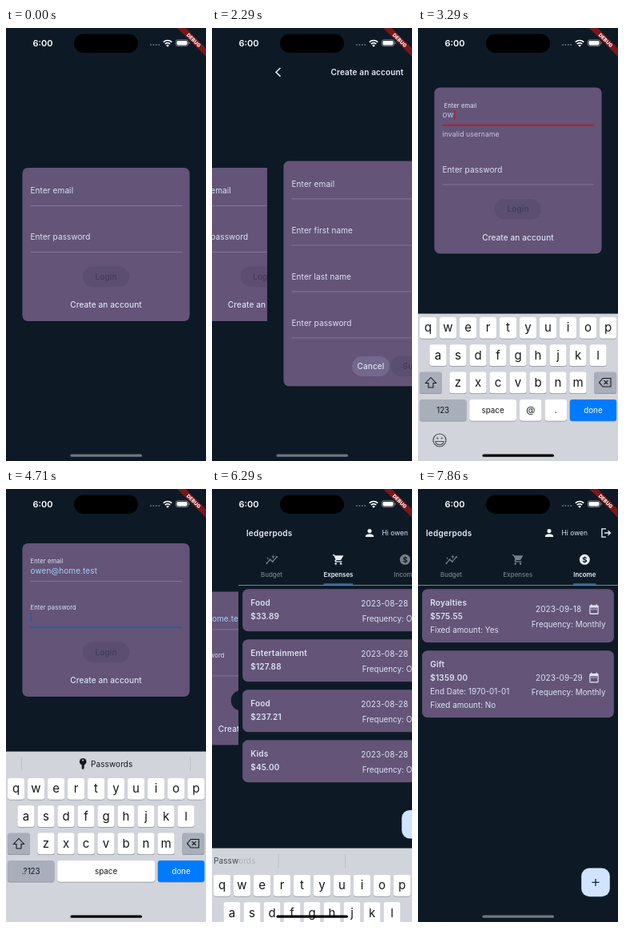
Write an HTML page that moves like this. It is 250 by 542 pixels and loops after 8000 ms.

```html
<!DOCTYPE html>
<html lang="en">
<head>
<meta charset="utf-8">
<title>Budget app</title>
<style>
html, body { margin: 0; width: 100%; height: 100%; overflow: hidden; background: #0d1a26; }
svg { display: block; width: 100vw; height: 100vh; }
text { font-family: Inter, Roboto, "Liberation Sans", sans-serif; white-space: pre; }
</style>
</head>
<body>
<svg id="stage" viewBox="0 0 250 542"></svg>
<script>
const BG = '#0d1a26', CARD = '#635478', PALE = '#dce3f3', SKY = '#a8cdf6', BLUE = '#225f98',
      RED = '#bd1a20', RULE = '#8a7f9e', GREY = '#78818b', INK = '#15171b';
const LOOP = 8000;
const USER = 'owen', MAIL = USER + '@home.test';

// [time, changed state]; each row builds on the one before
const STEPS = [
  [0, { page: 'login', off: 0, press: '', mail: 0, dots: 0, focus: '', rise: 1, err: '', caret: 1,
        kb: 542, kind: 'mail', tab: 1, slide: 0, shake: 0, bar: 0 }],
  [860, { press: 'create' }],
  [1000, { page: 'signup', off: 6, press: '' }],
  [1140, { off: 0 }],
  [2290, { off: 69, press: 'cancel' }],
  [2430, { page: 'login', press: '' }],
  [2710, { focus: 'mail', kb: 500, rise: .4 }],
  [2860, { kb: 385, rise: 1 }],
  [3000, { kb: 357 }],
  [3140, { mail: 1 }],
  [3290, { mail: 2, err: 'mail', shake: 2 }],
  [3430, { mail: 3, shake: 0 }],
  [3570, { mail: 4 }],
  [3710, { mail: 5 }],
  [3860, { mail: 7 }],
  [4000, { mail: 9 }],
  [4140, { mail: 12 }],
  [4290, { mail: 14 }],
  [4430, { focus: 'pass', kind: 'pass', kb: 328, rise: .4 }],
  [4570, { err: '', rise: 1 }],
  [4860, { caret: 0 }],
  [5000, { dots: 2, err: 'pass', caret: 1 }],
  [5140, { dots: 3 }],
  [5290, { dots: 5 }],
  [5430, { dots: 6 }],
  [5570, { dots: 7 }],
  [5710, { dots: 8, err: '', caret: 0 }],
  [5860, { press: 'done' }],
  [6000, { press: '' }],
  [6140, { page: 'home', off: 190, kb: 340, focus: '' }],
  [6290, { off: 33, kb: 449, bar: 1 }],
  [6430, { off: 4, kb: 515 }],
  [6570, { off: 0, kb: 542 }],
  [7570, { press: 'tab' }],
  [7710, { press: '', tab: 2, slide: 3 }],
  [7860, { slide: 0 }]
];
const states = [];
STEPS.forEach(([at, change]) => states.push({ ...states[states.length - 1], ...change, at }));

const stage = document.getElementById('stage');
const lerp = (a, b, k) => a + (b - a) * k;

// y is the middle of the capitals
function text(x, y, str, size = 10, fill = PALE, { w = 400, a = 'start', ls = 0, id = '' } = {}) {
  return `<text x="${x}" y="${y + size * .36}" font-size="${size}" fill="${fill}" font-weight="${w}" ` +
    `text-anchor="${a}" letter-spacing="${ls}" ${id && `id="${id}"`}>${str}</text>`;
}
const mid = (x, y, str, size, fill, o) => text(x, y, str, size, fill, { a: 'middle', ...o });
const rect = (x, y, w, h, fill, r = 0, more = '') =>
  `<rect x="${x}" y="${y}" width="${w}" height="${h}" rx="${r}" fill="${fill}" ${more}/>`;
const path = (d, more) => `<path d="${d}" ${more}/>`;
const line = (d, color, w = 1) => path(d, `fill="none" stroke="${color}" stroke-width="${w}"`);
const move = (x, y, body) => `<g transform="translate(${x} ${y})">${body}</g>`;
const dot = (x, y, r, fill) => `<circle cx="${x}" cy="${y}" r="${r}" fill="${fill}"/>`;
const card = (x, y, w, h) => rect(x, y + .9, w, h, '#000', 7, 'opacity=".3"') + rect(x, y, w, h, CARD, 7);
// 24-unit icon drawn around a centre
const icon = (x, y, body, size = 15.3) =>
  `<g transform="translate(${x} ${y}) scale(${size / 24}) translate(-12 -12)">${body}</g>`;

const ICONS = {
  cart: c => path('M7 18a2 2 0 1 0 0 4 2 2 0 0 0 0-4zM1 2v2h2l3.6 7.6-1.4 2.4c-.7 1.4.3 3 1.8 3h12v-2H7.4l1.1-2h7.5c.7 0 1.4-.4 1.7-1l3.6-6.5A1 1 0 0 0 20 4H5.2l-.9-2zM17 18a2 2 0 1 0 0 4 2 2 0 0 0 0-4z', `fill="${c}"`),
  chart: c => line('M2 20 9 12 14 16 22 7', c, 2) + dot(2.5, 19.5, 1.6, c) + dot(9, 12, 1.8, c) +
    dot(14, 16, 1.8, c) + dot(22, 7, 1.8, c) +
    path('M15 2 16 5.5 19 6.500 16 7.500 15 11 14 7.500 11 6.500 14 5.500zM4.500 7 5.200 9 7 9.700 5.200 10.400 4.500 12.500 3.800 10.400 2 9.700 3.800 9z', `fill="${c}"`),
  coin: c => dot(12, 12, 10.2, c) + mid(12, 12, '$', 15, BG, { w: 700 }),
  person: c => dot(12, 8, 4, c) + path('M4 20v-2c0-2.700 5.300-4 8-4s8 1.300 8 4v2z', `fill="${c}"`),
  logout: c => line('M12 4H4V20H12M9 12H20M16 7.500 20.500 12 16 16.500', c, 2.1),
  date: c => path('M19 4h-1V2h-2v2H8V2H6v2H5a2 2 0 0 0-2 2v14a2 2 0 0 0 2 2h14a2 2 0 0 0 2-2V6a2 2 0 0 0-2-2zm0 16H5V9h14zM7 11h2v2H7zm4 0h2v2h-2zm4 0h2v2h-2z', `fill="${c}" fill-rule="evenodd"`)
};

function field(y, label, { value = '', float = 0, focus, err, shake = 0 } = {}) {
  const color = err ? RED : focus ? BLUE : RULE, thick = err || focus;
  return text(30.5 + shake, y + lerp(28.5, 22, float) + shake / 2, label, lerp(10, 7.6, float), PALE, { ls: .1 }) +
    value + rect(30.5, y + (thick ? 46.3 : 47), 189.5, thick ? 1.8 : .8, color) +
    (err ? text(30.5, y + 58, err, 8.7, '#cfc7df', { ls: .1 }) : '');
}

function pill(x, y, w, label, on) {
  return rect(x, y - 12.7, w, 25.4, on ? '#111c2b' : '#5b4e71', 12.7) +
    mid(x + w / 2, y, label, 10, on ? PALE : '#453a58', { w: 500, ls: .15 });
}

function login(s) {
  const h = s.err ? 208 : 192, top = s.kb / 2 - h / 2;
  const gap = s.err === 'mail' ? 16 : 0, low = s.err ? 16 : 0;
  const onMail = s.focus === 'mail', onPass = s.focus === 'pass';
  const float = (on, n) => n ? 1 : on ? s.rise : 0;
  let dots = '';
  for (let i = 0; i < s.dots; i++) dots += dot(33 + i * 5.1, 92.5 + gap, .95, SKY);
  const caretY = onMail ? 28.5 : 87 + gap;
  return move(0, top,
    card(20.4, 0, 209.2, h) +
    field(0, 'Enter email', {
      value: text(30.5, 34, MAIL.slice(0, s.mail), 10, SKY, { ls: .1, id: 'mail' }),
      float: float(onMail, s.mail), focus: onMail, err: s.err === 'mail' && 'invalid username', shake: s.shake
    }) +
    field(58 + gap, 'Enter password', {
      float: float(onPass, s.dots), focus: onPass, err: s.err === 'pass' && 'invalid password'
    }) + dots +
    (s.focus && s.caret ? rect(30.5 + s.dots * 5.1, caretY, 1.3, 11.5, s.err === s.focus ? RED : BLUE, .6, 'id="caret"') : '') +
    pill(96, 136.3 + low, 58, 'Login', s.dots > 7) +
    (s.press === 'create' ? rect(68, 159 + low, 114, 25, '#72668a', 12.5) : '') +
    mid(125, 171.8 + low, 'Create an account', 10, PALE, { w: 450, ls: .12 }));
}

function signup(s) {
  const labels = ['Enter email', 'Enter first name', 'Enter last name', 'Enter password'];
  return rect(0, 0, 250, 542, BG) +
    line('M16.500 50 11 55.300 16.500 60.600', '#eef2f8', 1.5) +
    mid(125, 55.3, 'Create an account', 10, '#e6ebf5', { w: 600, ls: .15 }) +
    card(20.4, 166.5, 209.2, 282) +
    labels.map((l, i) => field(166.5 + i * 58, l)).join('') +
    (s.press === 'cancel' ? rect(106, 411, 47, 25, '#74688d', 12.5) : '') +
    mid(129.5, 423.3, 'Cancel', 10, PALE, { w: 500, ls: .1 }) +
    pill(154.5, 423.3, 64, 'Submit', false);
}

// the first two rows are bold
function entry(y, h, rows, date, often) {
  const c = often === 'Once' ? 193.3 : 187, m = y + h / 2;
  return card(5.1, y, 239.8, h) +
    rows.map((r, i) => i < 2
      ? text(15.2, y + 17 + i * 17, r, 10, PALE, { w: 600, ls: .2 })
      : text(15.2, y + 17 + i * 17, r, 9.9)).join('') +
    text(c - 40, m - 8, date, 10, PALE, { ls: .05 }) + icon(c + 33, m - 8.2, ICONS.date(PALE)) +
    text(234.5, m + 10.5, 'Frequency: ' + often, 9.9, PALE, { a: 'end' });
}

const expenses = () => [['Food', '$33.89'], ['Entertainment', '$127.88'], ['Food', '$237.21'], ['Kids', '$45.00']]
  .map((r, i) => entry(125.2 + i * 63, 53, r, '2023-08-28', 'Once')).join('');
const income = () =>
  entry(125.2, 67, ['Royalties', '$575.55', 'Fixed amount: Yes'], '2023-09-18', 'Monthly') +
  entry(202.3, 84, ['Gift', '$1359.00', 'End Date: 1970-01-01', 'Fixed amount: No'], '2023-09-29', 'Monthly');

function home(s) {
  const tabs = [['Budget', 'chart', 28], ['Expenses', 'cart', 37], ['Income', 'coin', 29]];
  const fab = Math.min(s.kb - 11.5, 510.2) - 35.6;
  let out = rect(0, 0, 250, 542, BG) +
    text(10, 55.3, 'ledgerpods', 10, '#e6ebf5', { w: 600, ls: .25 }) +
    icon(164, 55, ICONS.person('#eef2f8')) +
    text(179.5, 55.3, 'Hi ' + USER, 8.5) +
    icon(235, 55, ICONS.logout('#eef2f8'));
  if (s.press === 'tab') out += rect(167, 73, 83, 47, '#1c2b3a', 4);
  tabs.forEach(([name, pic, w], i) => {
    const x = 41.5 + i * 83.4, on = i === s.tab, c = on ? '#e8eef6' : GREY;
    out += icon(x, 88.3, ICONS[pic](c)) + mid(x, 107, name, 7.9, c, { w: on ? 600 : 500 });
    if (on) out += rect(x - w / 2 - s.slide, 118, w, 2.2, BLUE, 1);
  });
  return out + rect(0, 120, 250, .9, '#8b929b') +
    move(s.slide, 0, s.tab === 1 ? expenses() : income()) +
    rect(204.2, fab, 35.6, 35.6, '#d1e4ff', 10) +
    line(`M217.500 ${fab + 17.8}h9M222 ${fab + 13.3}v9`, '#14263a', 1.3);
}

function key(x, y, w, label, size = 15, fill = '#fff', color = INK) {
  return rect(x, y + .8, w, 26.7, '#8b8e95', 3.2) + rect(x, y, w, 26.7, fill, 3.2) +
    mid(x + w / 2, y + 13, label, size, color);
}

function keyboard(s) {
  if (s.kb >= 542) return '';
  const pass = s.kind === 'pass', grey = '#a9afba', down = s.press === 'done';
  let k = '';
  [['qwertyuiop', 1.9, 362], ['asdfghjkl', 14.4, 396.3], ['zxcvbnm', 39.4, 430.6]].forEach(([row, x, y]) =>
    [...row].forEach((c, i) => k += key(x + i * 25, y, 21.2, c)));
  k += key(1.9, 430.6, 28, '', 1, grey) + key(220.1, 430.6, 28, '', 1, grey) +
    line('M16 437.500 22.500 444.500H19V450H13V444.500H9.500z', INK, 1.1) +
    line('M231 438.500H241V449H231L226.500 443.700zM232.500 441.200l5 5m0-5-5 5', INK, 1.1);
  k += key(1.9, 465, 58.5, pass ? '.?123' : '123', 9.8, grey);
  if (pass) k += key(64.2, 465, 121.8, 'space', 9.8);
  else {
    k += key(64.2, 465, 58.8, 'space', 9.8) + key(127, 465, 27.5, '@', 11.5) + key(158.5, 465, 27.5, '.', 11.5) +
      line('M35 516a8 8 0 1 0-16 0 8 8 0 0 0 16 0M22 517.500H32C31.500 523 22.500 523 22 517.500z', '#4b4f57', 1.2) +
      dot(24.3, 513.5, 1.1, '#4b4f57') + dot(29.7, 513.5, 1.1, '#4b4f57');
  }
  k += key(189.8, 465, 58.3, 'done', 9.8, down ? '#fff' : '#007aff', down ? INK : '#fff');
  if (pass) {
    const marks = s.bar ? [83, 166.5] : [19.5, 230.5];
    k += marks.map(x => rect(x - .4, 336, .8, 17, '#b7bbc3')).join('');
    k += s.bar
      ? text(2, 344.5, 'Passw<tspan opacity=".25">ords</tspan>', 10, '#44484f', { ls: .1 })
      : dot(96.2, 341.3, 4.3, INK) + dot(96.2, 339.5, 1.1, '#d1d4da') +
        path('M94.700 344h3v5l-1.500 2.500-1.500-2z', `fill="${INK}"`) +
        text(106, 344.5, 'Passwords', 10, INK, { ls: .1 });
  }
  return rect(0, s.kb + .6, 250, 543 - s.kb, '#d1d4da') + move(0, s.kb - (pass ? 328 : 357), k);
}

function chrome(s) {
  const white = '#fff';
  return text(33.5, 19, '6:00', 11, white, { w: 600 }) +
    rect(85, 7.5, 80, 23.5, '#000', 11.7) +
    [181, 184.4, 187.8, 191.2].map(x => dot(x, 21, .95, '#6b7480')).join('') +
    line('M196.800 17.700a7.300 7.300 0 0 1 10.400 0M198.800 20a4.500 4.500 0 0 1 6.400 0', white, 1.7) +
    path('M202 23.800l-1.900-2a2.700 2.700 0 0 1 3.800 0z', `fill="${white}"`) +
    rect(212.3, 14.8, 15.4, 7.8, 'none', 2.4, 'stroke="#8d949c" stroke-width=".8"') +
    rect(213.5, 16, 13, 5.4, white, 1.4) + rect(228.6, 17.3, 1, 2.8, '#8d949c', .5) +
    `<g transform="translate(250 0) rotate(45)">` +
    rect(-26, 17.3, 52, 8.8, '#000', 0, 'opacity=".25"') +
    rect(-26, 17.8, 52, 7.7, '#b71c1c', 0, 'opacity=".64"') +
    mid(0, 21.7, 'DEBUG', 6.2, white, { w: 800, ls: .1 }) + '</g>' +
    rect(80.5, 533.6, 89.5, 3.2, s.kb < 530 ? '#000' : '#70757c', 1.6);
}

function draw(s) {
  const under = s.page !== 'login', shift = under ? -(250 - s.off) / 3 : 0;
  let out = rect(0, 0, 250, 542, BG);
  if (!under || s.off) out += move(shift, 0, login(s));
  if (under) out += move(s.off, 0, s.page === 'signup' ? signup(s) : home(s));
  stage.innerHTML = out + keyboard(s) + chrome(s);
  const caret = document.getElementById('caret');
  if (caret && s.focus === 'mail' && s.mail)
    caret.setAttribute('x', 31 + document.getElementById('mail').getComputedTextLength());
}

const start = performance.now();
let shown = null;
function tick() {
  const t = (performance.now() - start) % LOOP;
  let now = states[0];
  for (const s of states) if (s.at <= t) now = s;
  if (now !== shown) draw(shown = now);
  requestAnimationFrame(tick);
}
tick();
</script>
</body>
</html>
```
